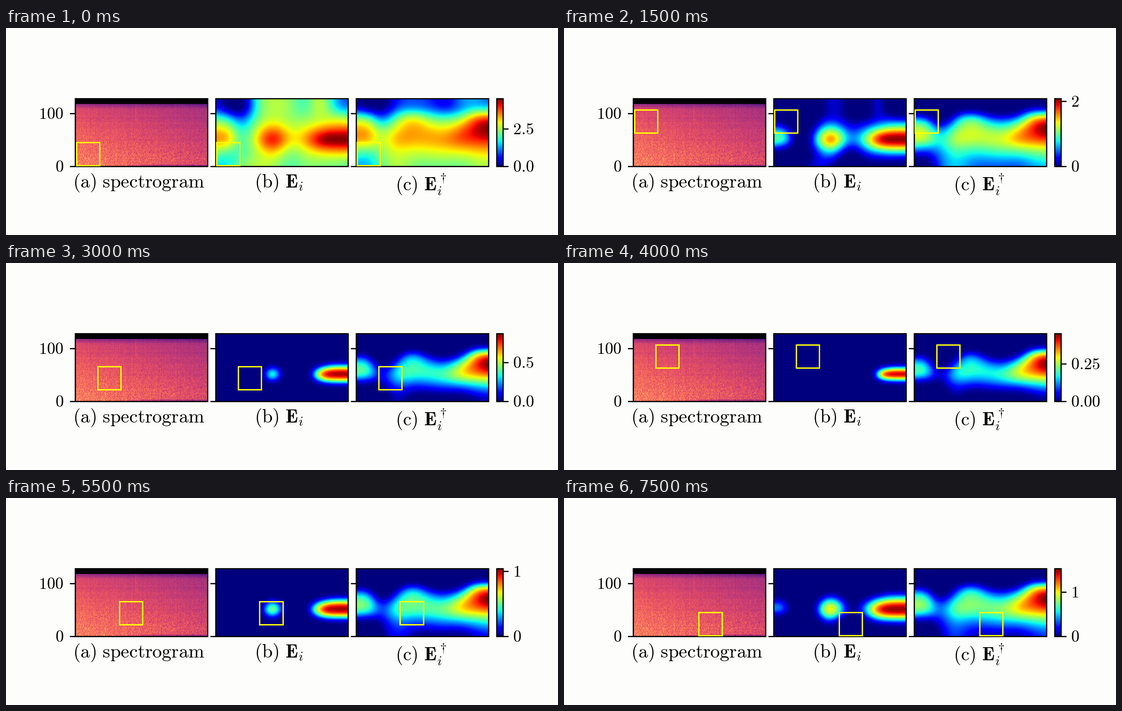
These frames come from a looping animation (1222x458 px, 8000 ms). A matplotlib script:

```python
import numpy as np
import matplotlib.pyplot as plt
from matplotlib.animation import FuncAnimation
from matplotlib.patches import Rectangle

plt.rcParams["mathtext.fontset"] = "cm"

W, H, DPI = 1222, 458, 100
PX = 72 / DPI
PW, PH, TOP = 293, 150, 156
PANELS = (153, 463.5, 774.5)
BAR_X, BAR_W = 1086, 14
ROWS = 5

# Per step: range of (b) and the colour bar, range of (c), upper tick label
STEPS = [
    (4.52, 1.00, "2.5"), (1.63, 0.77, "1"), (1.05, 0.62, "1"), (2.08, 0.65, "2"),
    (3.24, 0.67, "2"), (2.08, 0.62, "2"), (0.87, 0.455, "0.5"), (0.53, 0.43, "0.5"),
    (0.45, 0.43, "0.25"), (2.08, 0.56, "2"), (2.52, 0.58, "2"), (1.04, 0.50, "1"),
    (0.45, 0.46, "0.25"), (1.10, 0.595, "1"), (2.08, 0.57, "2"), (1.53, 0.53, "1"),
]

# Distance below the peak at a coarse grid of points
KNOTS_X = np.array([0, 28, 55, 90, 127, 165, 200, 233, 265, 293])
KNOTS_Y = np.array([0, 22, 40, 65, 92, 115, 150])
DROP_B = [
    [4.1, 4.7, 4.9, 2.8, 1.95, 2.2, 2.5, 1.95, 3.1, 3.7],
    [3.7, 4.5, 4.8, 2.8, 1.95, 2.15, 2.45, 1.9, 2.8, 3.3],
    [2.7, 3.2, 3.8, 2.55, 1.9, 2.1, 2.2, 1.9, 2.05, 2.2],
    [1.6, 1.9, 2.8, 2.0, 1.2, 1.75, 1.65, 1.2, 0.95, 0.95],
    [1.15, 1.4, 2.4, 1.6, 0.45, 1.45, 1.15, 0.18, -0.1, -0.1],
    [2.0, 2.3, 2.5, 1.9, 1.25, 2.0, 1.7, 1.25, 1.1, 1.1],
    [3.1, 2.9, 2.3, 1.9, 2.1, 2.5, 2.3, 2.3, 2.4, 2.5],
]
DROP_C = [
    [0.95, 1.05, 1.08, 0.88, 0.80, 0.85, 0.90, 0.74, 0.72, 0.80],
    [0.88, 0.98, 1.02, 0.80, 0.72, 0.78, 0.84, 0.72, 0.62, 0.62],
    [0.55, 0.62, 0.80, 0.58, 0.43, 0.55, 0.60, 0.50, 0.28, 0.22],
    [0.29, 0.33, 0.51, 0.37, 0.27, 0.33, 0.35, 0.23, 0.07, -0.02],
    [0.27, 0.30, 0.40, 0.29, 0.27, 0.27, 0.24, 0.17, 0.13, 0.10],
    [0.50, 0.52, 0.47, 0.37, 0.38, 0.37, 0.35, 0.33, 0.30, 0.28],
    [0.72, 0.70, 0.55, 0.44, 0.50, 0.53, 0.53, 0.53, 0.48, 0.45],
]


def spline(knots, size):
    """Matrix of a natural cubic spline from the knots to pixel centres."""
    k, x = knots / 100, (np.arange(size) + 0.5) / 100
    n = len(k)
    poly = np.c_[np.ones(n), k]
    a = np.block([[abs(k[:, None] - k) ** 3, poly], [poly.T, np.zeros((2, 2))]])
    basis = np.c_[abs(x[:, None] - k) ** 3, np.ones(size), x]
    return basis @ np.linalg.inv(a)[:, :n]


def blur(size, sigma=6):
    i = np.arange(size)
    g = np.exp(-((i[:, None] - i) ** 2) / (2 * sigma**2))
    return g / g.sum(1, keepdims=True)


SPLINE_X, SPLINE_Y = spline(KNOTS_X, PW), spline(KNOTS_Y, PH)
BLUR_X, BLUR_Y = blur(PW), blur(PH)
FIELD_B, FIELD_C = (SPLINE_Y @ np.array(d) @ SPLINE_X.T for d in (DROP_B, DROP_C))


def heat(field, span):
    return BLUR_Y @ np.clip(1 - field / span, 0, 1) @ BLUR_X.T


def spectrogram():
    rng = np.random.default_rng(4)
    rows, cols = 128, PW
    t = np.linspace(1, 0, rows)[:, None]
    x = np.linspace(0, 1, cols)
    grain = rng.normal(size=(rows + 1, cols))
    grain = (grain[1:] + grain[:-1]) / 1.4
    s = 0.75 - 0.14 * x - t * (0.18 - 0.01 * x)
    s = s + grain * (0.014 + 0.042 * (1 - t) ** 1.3)
    s += rng.normal(0, 0.009, cols) + rng.normal(0, 0.009, (rows, 1))
    s[10:42, 134] += 0.09
    s[8:80, 222] += 0.05
    s[10:19] -= np.linspace(0.17, 0.03, 9)[:, None]
    s[-4:] -= np.linspace(0.05, 0.25, 4)[:, None] * np.clip(x * 3 - 0.8, 0.1, 1)
    s[:10] = 0
    return np.clip(s, 0, 1)


fig = plt.figure(figsize=(W / DPI, H / DPI), dpi=DPI, facecolor="#fdfdfb")
ax = fig.add_axes([0, 0, 1, 1])


def picture(data, x, w, cmap):
    return ax.imshow(data, cmap=cmap, vmin=0, vmax=1, aspect="auto",
                     interpolation="nearest", extent=(x, x + w, TOP + PH, TOP))


def frame(x, w):
    ax.add_patch(Rectangle((x, TOP), w, PH, fill=False, ec="black", lw=2.7 * PX,
                           joinstyle="miter", zorder=5))


def tick(x, y):
    return ax.plot([x, x + 12], [y, y], color="black", lw=2.7 * PX,
                   solid_capstyle="butt", zorder=4)[0]


def label(x, y, text, size=36.4, ha="left"):
    return ax.text(x, y, f"${text}$", fontsize=size * PX, ha=ha, va="baseline")


def bar_y(value, vmax):
    return TOP + PH - PH * value / vmax


picture(spectrogram(), PANELS[0], PW, "magma")
map_b = picture(heat(FIELD_B, 1), PANELS[1], PW, "jet")
map_c = picture(heat(FIELD_C, 1), PANELS[2], PW, "jet")
picture(np.linspace(1, 0, 256)[:, None], BAR_X, BAR_W, "jet")
frame(BAR_X, BAR_W)

DROP = 12.4  # from tick to text baseline
boxes = []
for px in PANELS:
    frame(px, PW)
    for value in (0, 100):
        tick(px - 12, bar_y(value, 128))
    box = Rectangle((px, TOP), 51.3, 50.3, fill=False, ec="#ffff00", lw=3 * PX,
                    joinstyle="miter", zorder=6)
    boxes.append(ax.add_patch(box))
for value in (0, 100):
    label(127.5, bar_y(value, 128) + DROP, value, ha="right")

label(148, 353.5, r"\mathrm{(a)\ spectrogram}", 42)
label(550, 353.5, r"\mathrm{(b)}\ \mathbf{E}_i", 42)
label(862, 360, r"\mathrm{(c)}\ \mathbf{E}_i^\dagger", 42)

LABEL_X = 1122.5
tick(BAR_X + BAR_W, TOP + PH)
zero = label(LABEL_X, TOP + PH + DROP, "0")
top_tick = tick(BAR_X + BAR_W, TOP)
top_label = label(LABEL_X, TOP, "1")

ax.set(xlim=(0, W), ylim=(H, 0))
ax.axis("off")


def update(i):
    span_b, span_c, text = STEPS[i]
    map_b.set_data(heat(FIELD_B, span_b))
    map_c.set_data(heat(FIELD_C, span_c))

    col, row = divmod(i, ROWS)
    for box, px in zip(boxes, PANELS):
        box.set_xy((px + 2.5 + 47.6 * col, 253.2 - 24 * row))

    y = bar_y(float(text), span_b)
    top_tick.set_ydata([y, y])
    top_label.set_y(y + DROP)
    top_label.set_text(f"${text}$")
    decimals = len(text.partition(".")[2])
    zero.set_text(f"${0:.{decimals}f}$")
    return [map_b, map_c, *boxes, top_tick, top_label, zero]


anim = FuncAnimation(fig, update, frames=len(STEPS), interval=500,
                     repeat=True, repeat_delay=0, blit=False)
plt.show()
```
